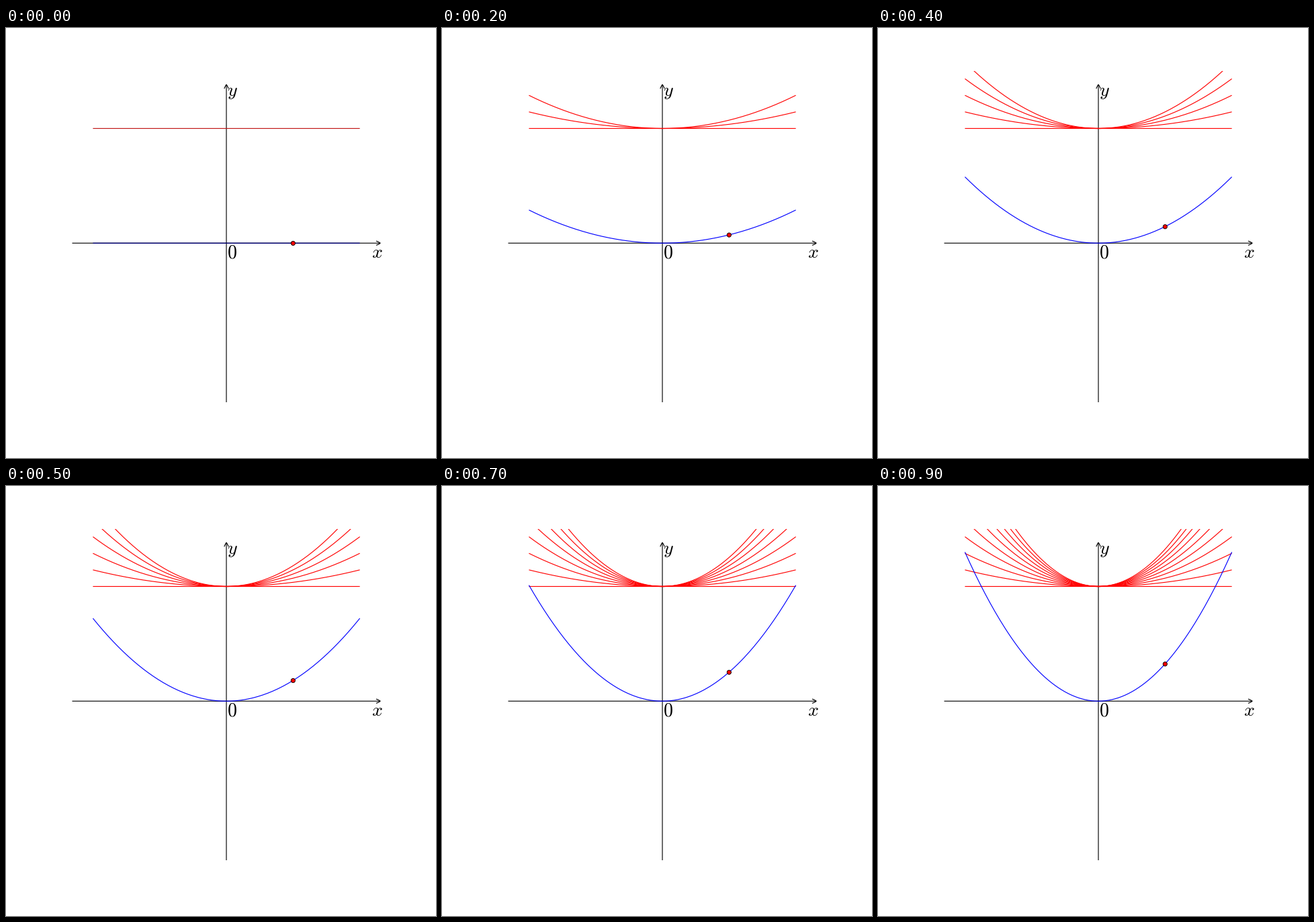
Animation of 640 by 640 pixels, one loop 1000 ms. Source, as a matplotlib script:

```python
import numpy as np
import matplotlib.pyplot as plt
from matplotlib.animation import FuncAnimation
from matplotlib.patches import Circle, Rectangle

SIZE, DPI, FRAMES = 640, 100, 10
PX = 72 / DPI
X0, Y0 = 328.0, 320.2      # origin of the axes
HALF = 198.6               # half-width of the curves
RISE = 24.65               # edge height gained per step
LIFT = 170.7               # offset of the red family
STROKE = 1.15 * PX

plt.rcParams["mathtext.fontset"] = "cm"
fig = plt.figure(figsize=(SIZE / DPI, SIZE / DPI), dpi=DPI, facecolor="white")
ax = fig.add_axes([0, 0, 1, 1])
ax.set(xlim=(0, SIZE), ylim=(SIZE, 0))
ax.axis("off")

u = np.linspace(-1, 1, 161)


def stroke(x, y, color, z):
    line, = ax.plot(x, y, color=color, lw=STROKE, zorder=z, snap=False,
                    solid_capstyle="butt", solid_joinstyle="round")
    return line


def parabola(step, base):
    return base - RISE * step * u ** 2


def arrow(tail, tip):
    """Thin axis with an open, slightly curved head."""
    tail, tip = np.array(tail), np.array(tip)
    along = (tip - tail) / np.hypot(*(tip - tail))
    across = np.array([-along[1], along[0]])
    stroke(*np.transpose([tail, tip]), "black", 1)
    s = np.linspace(-1, 1, 21)[:, None]
    head = tip - along * 6 * np.abs(s) ** 1.3 + across * 3.2 * s
    stroke(*head.T, "black", 1)


arrow((98.5, Y0), (557, Y0))
arrow((X0, 557), (X0, 84.3))
for x, y, label in [(544, 342, "$x$"), (329, 101.3, "$y$"), (329, 342.6, "$0$")]:
    ax.text(x, y, label, fontsize=20, ha="left", va="baseline", zorder=1)

window = Rectangle((0, 64), SIZE, SIZE - 64, transform=ax.transData)
family = [stroke(X0 + HALF * u, parabola(k, Y0 - LIFT), "red", 2)
          for k in range(FRAMES)]
for line in family:
    line.set_clip_path(window)
curve = stroke(X0 + HALF * u, parabola(0, Y0), "blue", 3)
dot = ax.add_patch(Circle((X0 + HALF / 2, Y0), 3.1, fc="red", ec="black",
                          lw=0.9 * PX, zorder=4))


def update(step):
    for k, line in enumerate(family):
        line.set_visible(k <= step)
        line.set_color("red" if step else "#c01414")
    curve.set_ydata(parabola(step, Y0))
    curve.set_color("blue" if step else "#00008c")
    dot.center = X0 + HALF / 2, Y0 + 0.2 - RISE * step / 4
    return [*family, curve, dot]


anim = FuncAnimation(fig, update, frames=FRAMES, interval=100,
                     repeat=True, repeat_delay=0)
plt.show()
```
